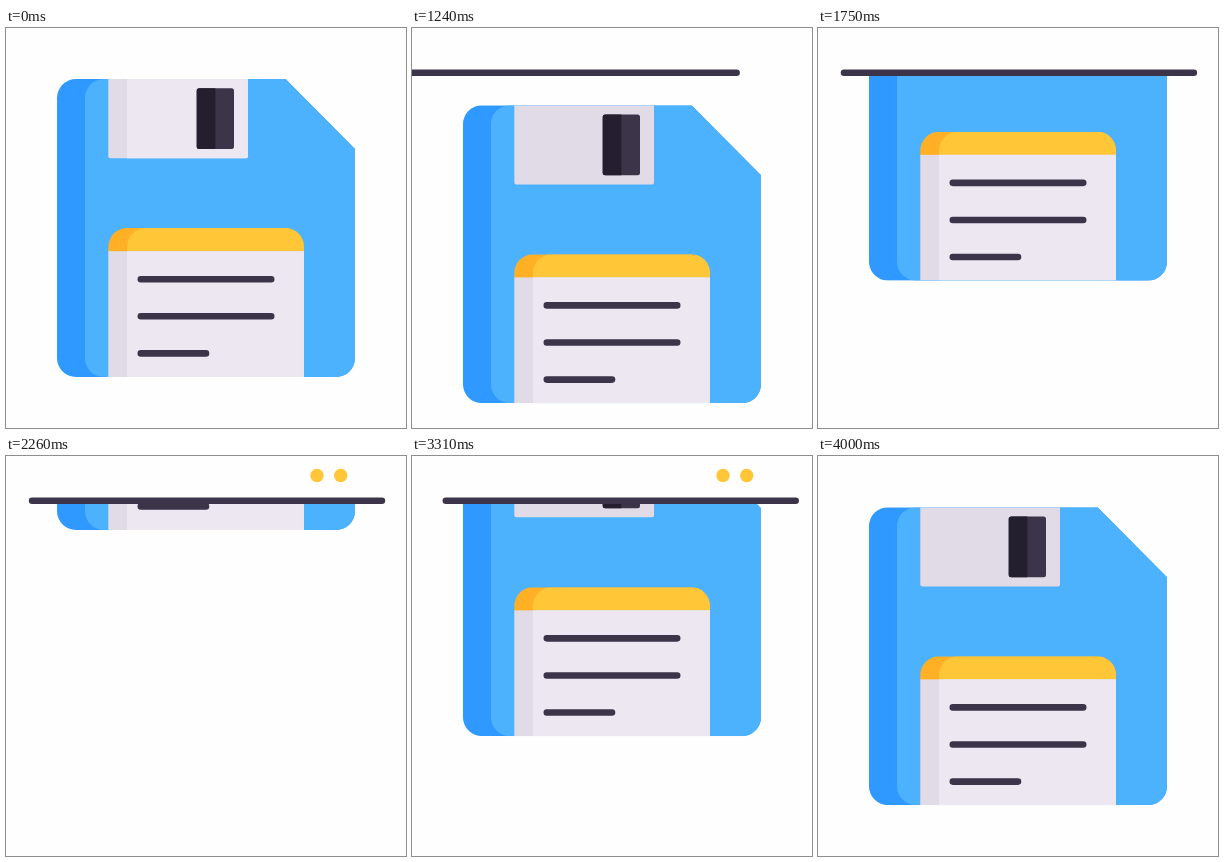
Write an HTML page that moves like this. It is 400 px wide and 400 px high and loops after 4.03 s.

```html
<!DOCTYPE html>
<html lang="en">
<head>
<meta charset="utf-8">
<title>Saving to disk</title>
<style>
  html, body { margin: 0; width: 100%; height: 100%; overflow: hidden; background: #fefefe; }
  svg { display: block; width: 100vw; height: 100vh; }
</style>
</head>
<body>
<svg viewBox="0 0 400 400">
  <clipPath id="slot"><rect y="45" width="400" height="355"/></clipPath>
  <clipPath id="body">
    <path d="M70 51H279.5L349 121V330a19 19 0 0 1-19 19H70a19 19 0 0 1-19-19V70a19 19 0 0 1 19-19Z"/>
  </clipPath>
  <clipPath id="label"><path d="M102.3 349V219a19 19 0 0 1 19-19H279a19 19 0 0 1 19 19V349Z"/></clipPath>

  <g clip-path="url(#slot)">
    <g id="disk">
      <g clip-path="url(#body)">
        <rect x="51" y="51" width="298" height="298" fill="#3099ff"/>
        <rect x="79" y="51" width="290" height="298" rx="19" fill="#4cb2fe"/>
        <rect x="102.3" y="40" width="139.7" height="90.2" rx="2" fill="#e0dbe6"/>
        <path id="shine" d="M121 51H242V128.2a2 2 0 0 1-2 2H121Z" fill="#ece7f1"/>
        <rect x="190.7" y="60.2" width="37.3" height="60.8" rx="2.5" fill="#3c3549"/>
        <path d="M209.4 60.2H193.2a2.5 2.5 0 0 0-2.5 2.5V118.5a2.5 2.5 0 0 0 2.5 2.5H209.4Z" fill="#231f2e"/>
        <g clip-path="url(#label)">
          <rect x="102" y="200" width="196" height="24" fill="#ffb025"/>
          <rect x="121" y="200" width="200" height="60" rx="19" fill="#ffc738"/>
          <rect x="102" y="223.2" width="196" height="126" fill="#e0dbe6"/>
          <rect x="121" y="223.2" width="177" height="126" fill="#ece7f1"/>
        </g>
        <g fill="none" stroke="#3c3549" stroke-width="6.6" stroke-linecap="round">
          <path d="M134.8 251.2H265.2M134.8 288.3H265.2M134.8 325.4H200"/>
        </g>
      </g>
    </g>
  </g>
  <rect id="bar" x="22.8" y="41.4" width="356.4" height="6.6" rx="3.3" fill="#3c3549"/>
  <g fill="#ffc738">
    <circle class="lamp" cx="311" cy="19.5" r="0"/>
    <circle class="lamp" cx="334.7" cy="19.5" r="0"/>
  </g>
</svg>
<script>
  const LOOP = 4030;
  const disk = document.getElementById('disk');
  const bar = document.getElementById('bar');
  const shine = document.getElementById('shine');
  const lamps = document.querySelectorAll('.lamp');

  const clamp = v => Math.min(1, Math.max(0, v));
  const smooth = s => s * s * (3 - 2 * s);

  // Cubic-bezier easing with control points (x1, 0) and (x2, 1).
  function ease(x, x1, x2) {
    let lo = 0, hi = 1;
    for (let i = 0; i < 24; i++) {
      const s = (lo + hi) / 2, r = 1 - s;
      if (3 * r * r * s * x1 + 3 * r * s * s * x2 + s * s * s < x) lo = s;
      else hi = s;
    }
    return smooth(lo);
  }

  // Each move: start, end, distance, easing handles.
  const moves = [
    [990, 1405, 40, 1 / 3, 2 / 3],
    [1405, 2100, -315, 0.486, 0.61],
    [2720, 3600, 304.5, 0.764, 0.52],
    [3600, 4020, -29.5, 1 / 3, 2 / 3]
  ];

  const diskY = t => moves.reduce((y, [from, to, dist, x1, x2]) =>
    t <= from ? y : y + dist * (t >= to ? 1 : ease((t - from) / (to - from), x1, x2)), 0);

  // The bar decelerates in from the left and accelerates out to the right.
  const barX = t => 380 * (2 ** ((t - 3614) / 54) - 2 ** ((1085 - t) / 54));

  const lampSize = (t, delay) =>
    smooth(clamp((t - 1860 - delay) / 150)) * (1 - smooth(clamp((t - 3340 - delay) / 150)));

  function draw(t) {
    disk.setAttribute('transform', `translate(0 ${diskY(t).toFixed(2)})`);
    const x = Math.max(-420, Math.min(420, barX(t)));
    bar.setAttribute('transform', `translate(${x.toFixed(2)} 0)`);
    shine.setAttribute('visibility', t < 1030 ? 'visible' : 'hidden');
    lamps.forEach((lamp, i) => lamp.setAttribute('r', 6.7 * lampSize(t, i * 60)));
  }

  const start = performance.now();
  function tick() {
    draw((performance.now() - start) % LOOP);
    requestAnimationFrame(tick);
  }
  draw(0);
  requestAnimationFrame(tick);
</script>
</body>
</html>
```
